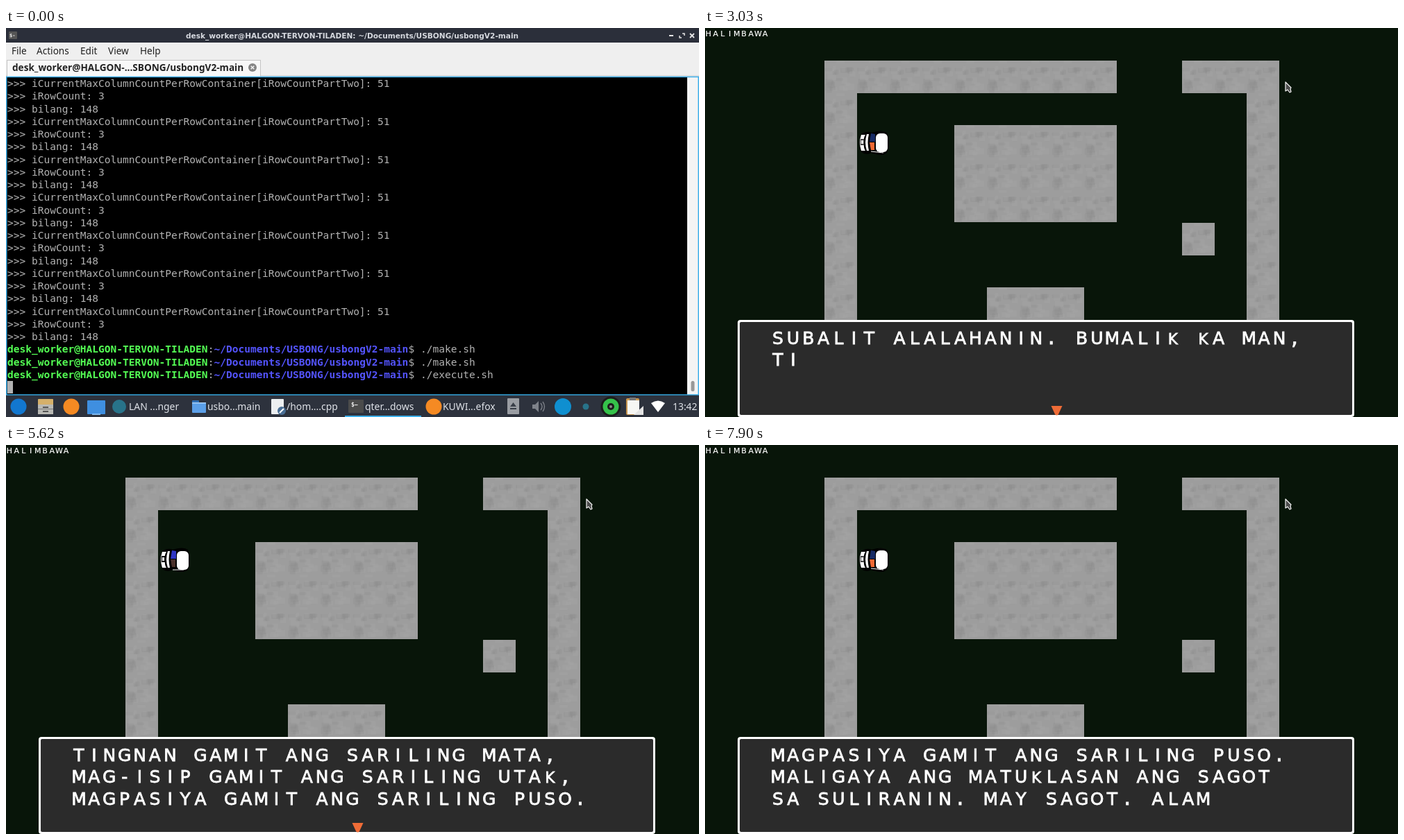
These frames come from a looping animation (998 px wide and 561 px high, 7990 ms). An HTML page with a canvas:

```html
<!DOCTYPE html>
<html lang="en">
<head>
<meta charset="utf-8">
<title>Terminal and maze game</title>
<style>
html, body { margin: 0; width: 100%; height: 100%; overflow: hidden; background: #000; }
canvas { display: block; }
</style>
</head>
<body>
<canvas id="stage" width="998" height="561"></canvas>
<script>
const W = 998, H = 561, LOOP = 7990;
const GAME_START = 3030;
let c = document.getElementById('stage').getContext('2d');

const USER = 'desk_worker', HOST = 'HALGON-TERVON-TILADEN';
const PATH = '~/Documents/USBONG/usbongV2-main';
const SANS = '"Noto Sans", sans-serif';
const DEJAVU = '"DejaVu Sans", sans-serif';
const MONO = '"DejaVu Sans Mono", monospace';

// ---------- helpers ----------
function rect(x, y, w, h, color) {
  c.fillStyle = color;
  c.fillRect(x, y, w, h);
}
function frame(x, y, w, h, color, line = 1) {
  c.strokeStyle = color;
  c.lineWidth = line;
  c.strokeRect(x, y, w, h);
}
function round(x, y, w, h, r, color) {
  c.fillStyle = color;
  c.beginPath();
  c.roundRect(x, y, w, h, r);
  c.fill();
}
function dot(x, y, r, color) {
  c.fillStyle = color;
  c.beginPath();
  c.arc(x, y, r, 0, 7);
  c.fill();
}
function shape(d, fill, stroke, line = 1) {
  const p = new Path2D(d);
  if (fill) { c.fillStyle = fill; c.fill(p); }
  if (stroke) { c.strokeStyle = stroke; c.lineWidth = line; c.stroke(p); }
}
function text(str, x, y, font, color, align = 'left') {
  c.font = font;
  c.fillStyle = color;
  c.textAlign = align;
  c.fillText(str, x, y);
}

// ---------- icons, centred on x, y ----------
const icons = {
  terminal(x, y) {
    round(x - 11, y - 10, 22, 19, 1, '#4b4b4b');
    text('$–', x - 7, y, `bold 8px ${MONO}`, '#eee');
  },
  folder(x, y) {
    round(x - 10, y - 9, 10, 6, 1, '#2f6fb5');
    round(x - 10, y - 6, 20, 15, 1, '#5b9fe8');
    rect(x - 10, y - 6, 20, 1.5, '#a9d0f7');
  },
  page(x, y) {
    round(x - 9, y - 11, 18, 22, 1, '#eceff1');
    dot(x + 6, y + 6, 6, '#4a6f96');
    shape(`M${x + 3} ${y + 9}l6 -6`, null, '#fff', 2);
  },
  window(x, y) {
    rect(x - 12, y - 11, 24, 22, '#dededc');
    rect(x - 12, y - 11, 24, 5, '#3f87cf');
    rect(x - 12, y - 6, 24, 4, '#9fc5ea');
  },
  browser(x, y) { dot(x, y, 11.5, '#f58a23'); },
  messenger(x, y) { dot(x, y, 10, '#28738a'); }
};

// ---------- desktop ----------
function titleBar() {
  rect(0, 0, W, 22, '#2b2f3a');
  round(4, 5, 12, 11, 1, '#555');
  text('$-', 5, 13, `bold 7px ${MONO}`, '#eee');
  text(`${USER}@${HOST}: ${PATH}`, 498.5, 14.5, `bold 10.57px ${DEJAVU}`, '#d6d9df', 'center');
  rect(955, 10, 6, 2, '#e6e6e6');
  shape('M974 8h3v3M970 11v3h3', null, '#e6e6e6', 1.5);
  shape('M985 8l6 6M991 8l-6 6', null, '#e6e6e6', 1.8);
}

function menuAndTab() {
  rect(0, 21, W, 49, '#efefef');
  const menu = { File: 8, Actions: 44, Edit: 107, View: 147, Help: 193 };
  for (const [name, x] of Object.entries(menu)) text(name, x, 38, `13.6px ${SANS}`, '#222');
  rect(0, 68, W, 2, '#dedede');
  round(1, 46, 366, 24, [3, 3, 0, 0], '#f8f8f8');
  frame(1.5, 46.5, 365, 24, '#c4c4c4');
  text(`${USER}@HALGON-...SBONG/usbongV2-main`, 9, 62, `bold 13.6px ${SANS}`, '#222');
  dot(355, 57, 6, '#858585');
  shape('M352.7 54.7l4.6 4.6M357.3 54.7l-4.6 4.6', null, '#fff', 1.3);
}

function shell(focused) {
  rect(0, 70, W, 460, '#000');
  const font = `14.53px ${MONO}`, bold = `bold ${font}`;
  const cell = 8.75, pitch = 18.26;
  const logs = ['iCurrentMaxColumnCountPerRowContainer[iRowCountPartTwo]: 51', 'iRowCount: 3', 'bilang: 148'];
  for (let row = 0; row < 24; row++) {
    const y = 85 + row * pitch;
    if (row < 21) {
      text('>>> ' + logs[row % 3], 2, y, font, '#b2b2b2');
      continue;
    }
    text(`${USER}@${HOST}`, 2, y, bold, '#54ff54');
    text(':', 2 + 33 * cell, y, font, '#b2b2b2');
    text(PATH, 2 + 34 * cell, y, bold, '#5454ff');
    text(row < 23 ? '$ ./make.sh' : '$ ./execute.sh', 2 + 66 * cell, y, font, '#b2b2b2');
  }
  if (focused) rect(2, 509, 8, 18, '#b2b2b2');
  else frame(2.5, 509.5, 7.5, 16.5, '#b2b2b2');
  rect(981, 70, 16, 459, '#f4f4f4');
  round(986.5, 509, 5, 15, 2.5, '#989898');
  if (focused) frame(0.75, 70.5, W - 1.5, 458.5, '#3daee9', 1.5);
}

function taskBar(focused) {
  rect(0, 530, W, 31, '#2d323d');
  if (focused) rect(488, 559, 110, 2, '#3daee9');
  const label = (str, x) => text(str, x, 551, `13.9px ${SANS}`, '#dfe2e8');
  dot(18, 546, 11.5, '#1277cf');

  round(46, 535, 22, 22, 1, '#d5b06a');
  rect(46, 543, 22, 14, '#b9b9b4');
  rect(46, 549, 22, 1, '#777');
  rect(53, 546, 8, 2, '#555');
  rect(53, 552, 8, 2, '#555');

  icons.browser(94, 546);
  round(117, 537, 26, 20, 1, '#3f8fe0');
  shape('M124 557h12', null, '#7fb8ee', 2);
  icons.messenger(163, 546);
  label('LAN ...nger', 177);
  icons.folder(278, 546);
  label('usbo...main', 290);
  icons.page(391, 546);
  label('/hom....cpp', 404);
  icons.terminal(504, 546);
  label('qter...dows', 517);
  icons.browser(616, 546);
  label('KUWI...efox', 629);

  round(722, 534, 17, 23, 1, '#9a9da3');
  shape('M726 546l4.5 -6l4.5 6zM726 548h9v2h-9z', '#3a3f49');
  shape('M758 543h4l5 -5v16l-5 -5h-4z', '#7e828a');
  shape('M770 541q4 5 0 10M773 539q5 7 0 14', null, '#7e828a', 1.3);
  dot(802, 546, 12, '#0f8fd0');
  dot(835, 546, 4.5, '#28738a');
  dot(871, 546, 14.5, '#1c1c1c');
  dot(871, 546, 11.5, '#35c24a');
  dot(871, 546, 5, '#1c1c1c');
  dot(871, 546, 2, '#888');
  round(893, 534, 19, 24, 2, '#c9964f');
  rect(895, 537, 17, 20, '#f7f7f4');
  rect(898, 533, 9, 4, '#777');
  shape('M904 558l14 -13v13z', '#e4e4e4');
  shape('M929 541q10 -7 20 0l-10 13z', '#fff');
  label('13:42', 960);
}

// Black band with a thin white line along both edges.
function windowOutline(height) {
  const band = 4.4, inset = band / 2;
  frame(inset, inset, W - band, height - band, '#fff', band);
  frame(inset, inset, W - band, height - band, '#000', 2.9);
}

function switcher(selected) {
  rect(332, 170, 333.5, 220.5, '#2f343f');
  const rows = [
    ['window', 'Tugon Window'],
    ['terminal', `${USER}@HALGON…SBONG/usbongV2-main`],
    ['terminal', `${USER}@${HOST}: ~`],
    ['browser', 'KUWIT 2021-02 — Mozilla Firefox'],
    ['page', `/home/${USER}/Do…sbongV2-main/Text.cpp`],
    ['folder', 'usbongV2-main'],
    ['messenger', 'LAN Messenger']
  ];
  rows.forEach(([icon, label], i) => {
    const y = 188 + i * 30.7;
    icons[icon](349.5, y);
    text(label, 368, y + 4, `bold 10.57px ${DEJAVU}`, '#d6d9df');
  });
  frame(335, 173.7 + selected * 30.7, 29, 29, '#a5a8ae', 1.4);
}

function pointer() {
  c.lineJoin = 'round';
  shape('M836 78v13l3 -2l3 4l2 -1l-1 -4l1 -2z', '#4c4c4c', '#f2f2f2', 1.2);
  c.lineJoin = 'miter';
}

function desktop(t) {
  const focused = t < 1130;
  titleBar();
  menuAndTab();
  shell(focused);
  taskBar(focused);
  if (t < 180) return;
  const selected = focused || (t >= 1590 && t < 1910) ? 1 : 0;
  if (t >= 270) windowOutline(530);
  if (!focused) {
    windowOutline(H);
    pointer();
  }
  switcher(selected);
}

// ---------- game ----------
const TILE = 46.78;
const WALLS = [ // column, row, columns, rows
  [0, 1, 9, 1], [11, 1, 3, 1], [0, 2, 1, 7], [13, 2, 1, 7],
  [4, 3, 5, 3], [11, 6, 1, 1], [5, 8, 3, 1]
];

function buildMaze() {
  const canvas = document.createElement('canvas');
  canvas.width = W;
  canvas.height = H;
  const screen = c;
  c = canvas.getContext('2d');
  rect(0, 0, W, H, '#081509');
  let seed = 7;
  const random = () => (seed = seed * 16807 % 2147483647) / 2147483647;
  const blots = Array.from({ length: 26 }, () => {
    const w = 4 + random() * 9, h = 3 + random() * 7;
    return [random() * (TILE - w), random() * (TILE - h), w, h,
      random() < 0.5 ? 'rgba(138,138,138,.22)' : 'rgba(170,170,170,.28)'];
  });
  for (const [col, row, cols, rows] of WALLS) {
    const x = Math.round(172 + col * TILE), y = Math.round(row * TILE);
    rect(x, y, Math.round(cols * TILE), Math.round(rows * TILE), '#9d9d9d');
    for (let i = 0; i < cols * rows; i++) {
      const tx = x + i % cols * TILE, ty = y + Math.floor(i / cols) * TILE;
      for (const [bx, by, w, h, color] of blots) round(tx + bx, ty + by, w, h, 1, color);
    }
  }
  c = screen;
  return canvas;
}
const maze = buildMaze();

const LINES = [
  'SUBALIT ALALAHANIN. BUMALIK KA MAN,',
  'TINGNAN GAMIT ANG SARILING MATA,',
  'MAG-ISIP GAMIT ANG SARILING UTAK,',
  'MAGPASIYA GAMIT ANG SARILING PUSO.',
  'MALIGAYA ANG MATUKLASAN ANG SAGOT',
  'SA SULIRANIN. MAY SAGOT. ALAM'
];

// The game advances in bursts: start, end, number of steps.
const BURSTS = [
  [3030, 3800, 9], [3890, 4500, 7], [4640, 5420, 9], [5620, 6370, 9],
  [6460, 6550, 2], [6960, 7620, 8], [7810, 7900, 2]
];
function gameStep(t) {
  let step = -1;
  for (const [start, end, n] of BURSTS) {
    if (t < start) break;
    step += 1 + Math.min(n - 1, Math.floor((t - start) / (end - start) * (n - 1) + 1e-6));
  }
  return step;
}

function visibleLines(step) {
  if (step < 16) {
    const n = 2 + 8 * step;
    return [LINES[0], LINES[1].slice(0, n), LINES[2].slice(0, Math.max(0, n - LINES[1].length))];
  }
  const top = step < 26 ? 1 : step < 36 ? 2 : 3;
  const typed = Math.ceil(4.2 * (step - 5 - 10 * top));
  return [LINES[top], LINES[top + 1], LINES[top + 2].slice(0, typed)];
}

// Every glyph sits in the middle of a cell of equal width.
function cellText(str, x, y, pitch, size, weight) {
  c.strokeStyle = '#fff';
  c.lineWidth = weight;
  [...str].forEach((ch, i) => {
    const scale = ch === 'K' ? 0.86 : '.,'.includes(ch) ? 1.25 : 1;
    text(ch, x + i * pitch, y, `${size * scale}px ${DEJAVU}`, '#fff', 'center');
    c.strokeText(ch, x + i * pitch, y);
  });
}

function robot(bright) {
  shape('M226 152Q234 148 240 151Q255 146 262 151Q267 165 262 180Q255 186 240 180Q232 184 225 179Q219 165 226 152Z', '#000');
  shape('M225 154h6q-3 4 -2 11q-1 8 2 12h-6q-4 -12 0 -23z', '#fff');
  rect(224, 160, 5, 9, bright ? '#444' : '#000');
  rect(225, 162, 3, 5, '#fff');
  shape('M233 153h3q-3 12 0 24h-3q-4 -12 0 -24z', '#fff');
  shape('M239 152l6 1v11h-8z', bright ? '#172c66' : '#3036c4');
  shape('M237 165h7v11h-5z', bright ? '#f26a35' : '#4b312b');
  round(246, bright ? 152 : 153, 17, 27, 6, '#fff');
  shape(bright ? 'M239 178l18 2' : 'M240 180h16', null, '#fff', 1);
}

function game(t) {
  const step = gameStep(t);
  c.drawImage(maze, 0, 0);
  cellText('HALIMBAWA', 5, 12, 10.2, 11, 0.2);
  robot(step % 3 === 0);
  pointer();
  round(47, 421, 888, 140, 4, '#fff');
  round(50, 424, 882, 134, 2, '#2b2b2b');
  visibleLines(step).forEach((line, i) => cellText(line, 105, 456 + i * 31.3, 21.88, 25, 0.8));
  if ((step + 2) % 8 < 4) shape('M498.5 545h16l-5.5 12q-2.5 3 -5 0z', '#ef6c37');
}

function draw(now) {
  const t = now % LOOP;
  if (t < GAME_START) desktop(t);
  else game(t);
  requestAnimationFrame(draw);
}
requestAnimationFrame(draw);
</script>
</body>
</html>
```
